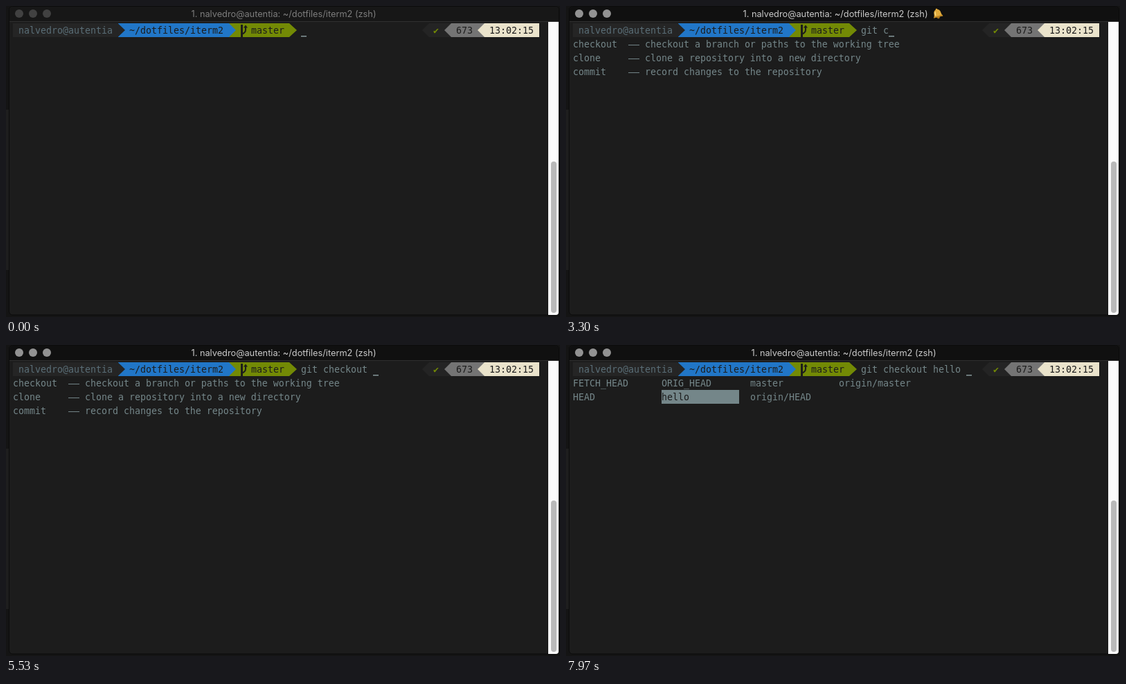
Write an HTML page that moves like this. It is 800 px wide and 450 px high and loops after 8 s.

```html
<!DOCTYPE html>
<html lang="en">
<head>
<meta charset="utf-8">
<title>Terminal completion</title>
<style>
  html, body { margin: 0; width: 100%; height: 100%; overflow: hidden; background: #141414; }
  svg { display: block; width: 800px; height: 450px; }
  text { white-space: pre; }
  .mono { font: 13.29px "DejaVu Sans Mono", monospace; }
  .title { font: 12.75px Inter, sans-serif; text-anchor: middle; }
  .ink { fill: #1c1c1c; }
  .fg { fill: #748689; }
</style>
</head>
<body>
<svg viewBox="0 0 800 450">
  <rect width="800" height="450" fill="#141414"/>
  <rect y="150" width="4" height="232" fill="#1e1e1e"/>
  <rect x="4.5" y="0.5" width="794" height="446.5" rx="5" fill="#1c1c1c" stroke="#0b0b0b"/>
  <path id="bar" d="M5 22V5q0-4 4-4H794q4 0 4 4V22z"/>
  <rect x="5" y="22" width="793" height="1" fill="#303030"/>
  <g id="buttons">
    <circle cx="19" cy="11" r="6"/><circle cx="39" cy="11" r="6"/><circle cx="59" cy="11" r="6"/>
  </g>
  <text id="title" class="title" y="16">1. nalvedro@autentia: ~/dotfiles/iterm2 (zsh)</text>
  <g id="bell" transform="translate(536.5 11) rotate(-14)">
    <circle cy="5.4" r="2" fill="#a8741a"/>
    <path d="M0-7.5q1.5 0 1.5 1.6Q5-4.800 5-.5Q5 2.500 7 5H-7Q-5 2.500-5-.5Q-5-4.800-1.500-5.900Q-1.500-7.500 0-7.500z" fill="#e3ac3c"/>
    <path d="M-6.500 4.300H6.500" stroke="#b98222" stroke-width="1.500"/>
    <path d="M-2.500-3q-1 2-.8 5" fill="none" stroke="#f7dc8a" stroke-width="1.500"/>
  </g>

  <path d="M783 23h15V443q0 4-4 4H783z" fill="#fcfcfc"/>
  <rect x="787" y="225" width="8" height="219" rx="4" fill="#b9b9b9"/>

  <rect x="10" y="25" width="153" height="20" fill="#252525"/>
  <path d="M409 25l11 10-11 10H322V25z" fill="#738a05"/>
  <path d="M322 25l10 10-10 10H162V25z" fill="#2176c7"/>
  <path d="M161.500 25l10.500 10-10.500 10z" fill="#252525"/>
  <text class="mono" x="18" y="40" fill="#5a6e77">nalvedro@autentia</text>
  <text class="mono ink" x="178" y="40">~/dotfiles/iterm2</text>
  <g fill="none" stroke="#1c1c1c">
    <path d="M340.500 27V45" stroke-width="3"/>
    <path d="M341 40.500q5-2 5-6V30" stroke-width="2"/>
    <path d="M343 31.500l3-4 3 4z" fill="#1c1c1c" stroke="none"/>
  </g>
  <text class="mono ink" x="354" y="40">master</text>

  <g id="rprompt">
    <path d="M644 25H611l-10 10 10 10h33z" fill="#242424"/>
    <path d="M692 25H643l-10 10 10 10h49z" fill="#747474"/>
    <path d="M770 25H691l-10 10 10 10h79z" fill="#eae3cb"/>
    <text class="mono" x="617" y="40" fill="#738a05">✔</text>
    <text class="mono ink" x="650" y="40">673</text>
    <text class="mono ink" x="698" y="40">13:02:15</text>
  </g>

  <text id="command" class="mono fg" x="426" y="40"></text>
  <rect id="cursor" y="43" width="8" height="1.500" fill="#85979a"/>
  <g id="list"></g>
</svg>
<script>
const LOOP = 8000, CELL = 8, LEFT = 10, PROMPT_END = 426;
const el = id => document.getElementById(id);

const verbs = [
  [0, 0, "checkout  —— checkout a branch or paths to the working tree"],
  [0, 1, "clone     —— clone a repository into a new directory"],
  [0, 2, "commit    —— record changes to the repository"]
];
const refs = [
  [0, 0, "FETCH_HEAD"], [0, 1, "HEAD"],
  [16, 0, "ORIG_HEAD"], [16, 1, "hello"],
  [32, 0, "master"], [32, 1, "origin/HEAD"],
  [48, 0, "origin/master"]
];

// Each step overrides part of the state from its start time on.
const steps = [
  [0, { focus: false, bell: false, command: "", list: [], pick: "" }],
  [1130, { focus: true }],
  [1800, { command: "g" }],
  [1930, { command: "gi" }],
  [2030, { command: "git" }],
  [2170, { command: "git " }],
  [2400, { command: "git c" }],
  [2970, { list: verbs, bell: true }],
  [4630, { command: "git ch", bell: false }],
  [4970, { command: "git checkout " }],
  [6100, { list: refs, bell: true }],
  [7000, { command: "git checkout FETCH_HEAD ", pick: "FETCH_HEAD", bell: false }],
  [7470, { command: "git checkout HEAD ", pick: "HEAD" }],
  [7770, { command: "git checkout hello ", pick: "hello" }]
];

let merged = {};
const states = steps.map(([at, change]) => ({ at, ...(merged = { ...merged, ...change }) }));

function listItem([column, row, label], pick) {
  const x = LEFT + column * CELL, y = 45 + row * 20, picked = label === pick;
  const box = picked ? `<rect class="fg" x="${x}" y="${y}" width="112" height="20"/>` : "";
  return `${box}<text class="mono ${picked ? "ink" : "fg"}" x="${x}" y="${y + 15}">${label}</text>`;
}

function render(s) {
  const cursorX = PROMPT_END + s.command.length * CELL;
  el("bar").setAttribute("fill", s.focus ? "#101010" : "#171717");
  el("buttons").setAttribute("fill", s.focus ? "#929292" : "#414141");
  el("title").setAttribute("fill", s.focus ? "#c9c9c9" : "#7d7d7d");
  el("title").setAttribute("x", s.bell ? 389 : 401);
  el("bell").style.display = s.bell ? "" : "none";
  el("rprompt").style.display = cursorX > 600 ? "none" : "";
  el("command").textContent = s.command;
  el("cursor").setAttribute("x", cursorX);
  el("list").innerHTML = s.list.map(item => listItem(item, s.pick)).join("");
}

const start = performance.now();
let shown;
function tick() {
  const t = (performance.now() - start) % LOOP;
  const state = states.findLast(s => s.at <= t);
  if (state !== shown) render(shown = state);
  requestAnimationFrame(tick);
}
tick();
</script>
</body>
</html>
```
